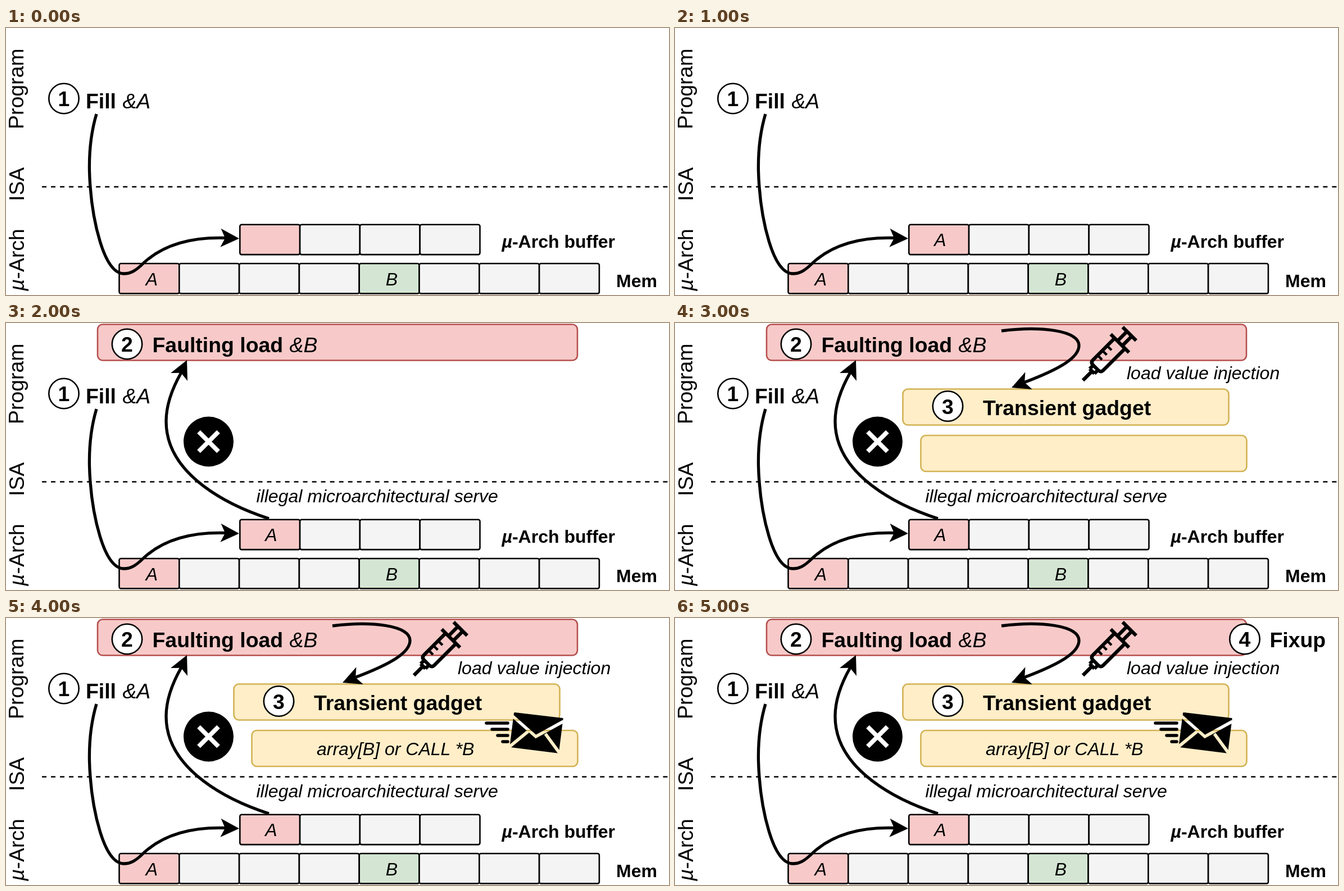
An HTML page that plays this animation: 1180 px wide and 475 px high, repeating every 6 s.

```html
<!DOCTYPE html>
<html lang="en">
<head>
<meta charset="utf-8">
<title>Load value injection</title>
<style>
  html, body { margin: 0; width: 100%; height: 100%; overflow: hidden; background: #fff; }
  svg { display: block; width: 1180px; height: 475px; }
  text { font: 32px "Liberation Sans", Arial, sans-serif; }
  .big { font-size: 37.4px; }
  .bold { font-weight: bold; }
  .it { font-style: italic; font-weight: normal; }
  .mid { text-anchor: middle; }
  .line { fill: none; stroke: #000; stroke-width: 5.3; }
  .cell { stroke: #000; stroke-width: 2.6; }
  .ring { fill: #fff; stroke: #000; stroke-width: 2.6; }
  .red { fill: #f7cac9; stroke: #b5504e; stroke-width: 2.6; }
  .yellow { fill: #ffeec8; stroke: #d2b254; stroke-width: 2.6; }
</style>
</head>
<body>
<svg viewBox="0 0 1180 475">
  <defs>
    <path id="head" d="M0 0L-33-16.5L-25 0L-33 16.5Z"/>
    <mask id="folds" maskUnits="userSpaceOnUse" x="890" y="160" width="110" height="90">
      <rect x="890" y="160" width="110" height="90" fill="#fff"/>
      <path d="M901 174L943 211L992 184M896 229L929 202M985 240L960 206" fill="none" stroke="#000" stroke-width="5.5"/>
    </mask>
  </defs>

  <text class="big" transform="translate(30.5 180) rotate(-90)">Program</text>
  <text class="big" transform="translate(31.5 308) rotate(-90)">ISA</text>
  <text class="big" transform="translate(31.5 468) rotate(-90)"><tspan class="it">µ</tspan>-Arch</text>
  <path d="M64 282.5H1180" stroke="#000" stroke-width="2.6" stroke-dasharray="8.01"/>

  <g id="cells"></g>
  <text class="it mid" x="259.5" y="457.5">A</text>
  <text class="it mid" x="686.5" y="457.5">B</text>
  <text class="bold" x="882.5" y="391"><tspan style="font-style:italic">µ</tspan>-Arch buffer</text>
  <text class="bold" x="1086" y="460.5">Mem</text>

  <g data-badge="1 103 125.5"></g>
  <text class="big bold" x="142" y="143">Fill <tspan class="it" dx="1">&amp;A</tspan></text>
  <path class="line" d="M161 153C150 190 146 235 150 283C154 335 172 437 210 437C221 437 230 433 245 418C275 390 320 371 392 373.5"/>
  <use href="#head" transform="translate(415 374.5) rotate(2)"/>

  <g data-from="1">
    <text class="it mid" x="472" y="388">A</text>
  </g>

  <g data-from="2">
    <rect class="red" x="163" y="2.5" width="854" height="64" rx="9"/>
    <g data-badge="2 215.5 37.5"></g>
    <text class="big bold" x="260.5" y="52">Faulting load <tspan class="it" dx="1">&amp;B</tspan></text>
    <path class="line" d="M468 348C400 326 285 272 285 175C285 145 296 116 312 88"/>
    <use href="#head" transform="translate(322 66) rotate(-65)"/>
    <circle cx="360.5" cy="211" r="44.5"/>
    <path d="M343 193.5L378 228.5M378 193.5L343 228.5" stroke="#fff" stroke-width="8"/>
    <text class="it" x="445.5" y="319">illegal microarchitectural serve</text>
  </g>

  <g data-from="3">
    <rect class="yellow" x="405.5" y="117.5" width="580" height="64" rx="9"/>
    <rect class="yellow" x="437.5" y="200" width="580" height="64" rx="9"/>
    <g data-badge="3 485.5 148"></g>
    <text class="big bold" x="548" y="164">Transient gadget</text>
    <path class="line" d="M581 14C650 5 719 13 719 40C719 62 684 82 622 105.5"/>
    <use href="#head" transform="translate(599 115) rotate(158)"/>
    <!-- syringe, drawn along its axis from the needle tip -->
    <g class="line" transform="translate(726 102) rotate(-45)" stroke-linejoin="round">
      <path d="M0 0H23M23-6V6M23-6H32V6H23M38-13H93M38 13H93M38-13Q32-13 32-6V6Q32 13 38 13M93-23V23M93-6H117M93 6H117M117-17V17" style="stroke-width:6.3"/>
      <path d="M50-13V-2M62-13V-2M74-13V-2" style="stroke-width:4.5"/>
    </g>
    <text class="it" x="804" y="100">load value injection</text>
  </g>

  <g data-from="4">
    <text class="it" x="553" y="244">array[B] or CALL *B</text>
    <path d="M906 168L991 178Q992 178 991.5 180L984 239Q984 241 982 240.5L898 230Q896 230 896.5 228L904 169Q904 168 906 168Z" mask="url(#folds)"/>
    <path d="M855 187H893M865 198H893M875 209H893M884 220H893" stroke="#000" stroke-width="5.5" stroke-linecap="round"/>
  </g>

  <g data-from="5">
    <g data-badge="4 1014 37.5"></g>
    <text class="big bold" x="1058.5" y="52">Fixup</text>
  </g>
</svg>
<script>
  const PINK = "#f7cac9", GREEN = "#d4e6d3", GREY = "#f4f4f4";

  const row = (x, y, colors) => colors.map((fill, i) =>
    `<rect class="cell" x="${x + i * 106.8}" y="${y}" width="106.8" height="53.4" rx="3" fill="${fill}"/>`).join("");

  document.getElementById("cells").innerHTML =
    row(416.3, 349.7, [PINK, GREY, GREY, GREY]) +
    row(201.5, 419, [PINK, GREY, GREY, GREY, GREEN, GREY, GREY, GREY]);

  for (const badge of document.querySelectorAll("[data-badge]")) {
    const [label, x, y] = badge.dataset.badge.split(" ").map(Number);
    badge.innerHTML = `<circle class="ring" cx="${x}" cy="${y}" r="26.7"/>
      <text class="big bold mid" x="${x}" y="${y + 13.5}">${label}</text>`;
  }

  const layers = document.querySelectorAll("[data-from]");

  function draw() {
    const step = Math.floor(performance.now() % 6000 / 1000);
    for (const layer of layers)
      layer.style.display = step >= layer.dataset.from ? "" : "none";
    requestAnimationFrame(draw);
  }
  draw();
</script>
</body>
</html>
```
